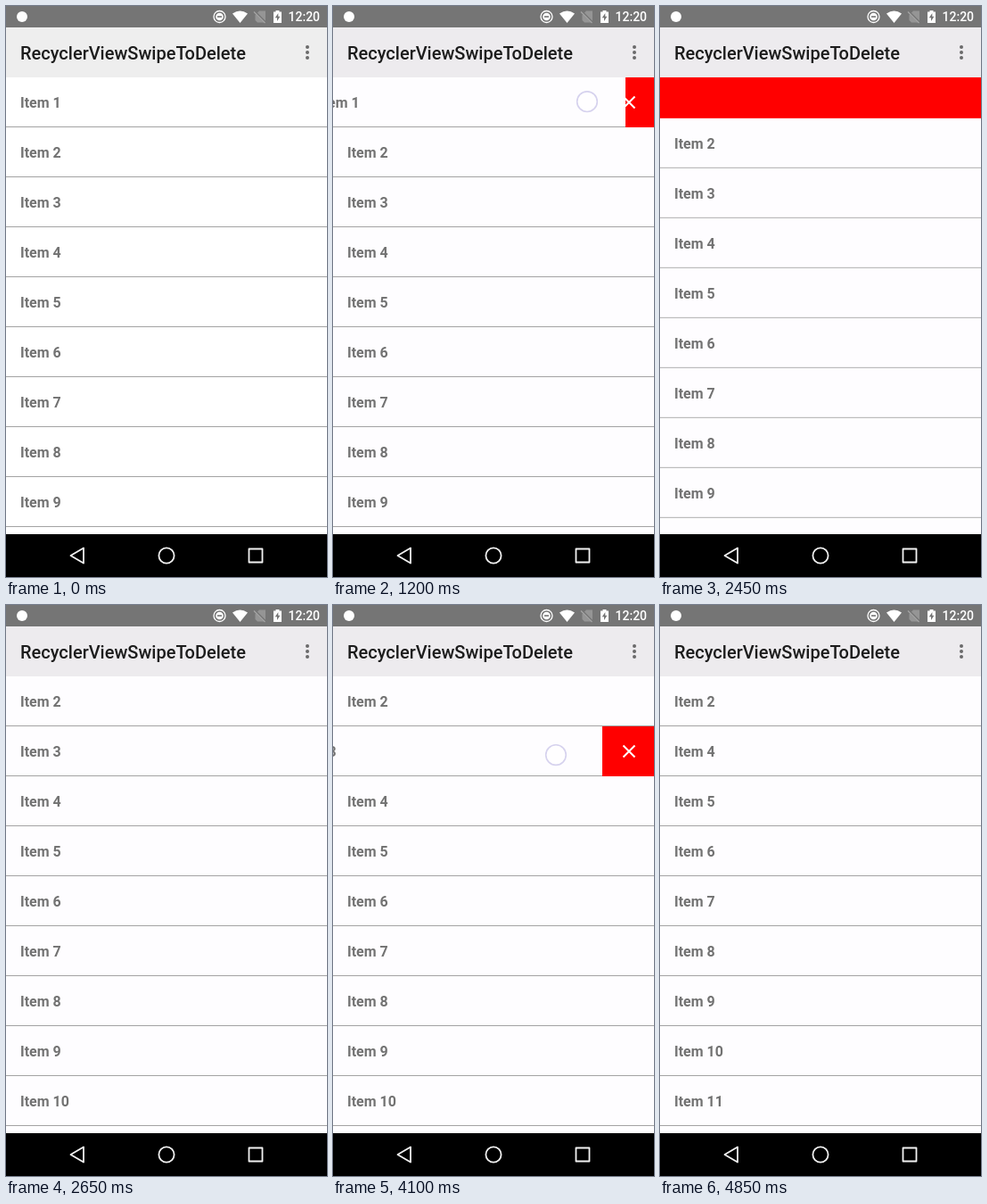
An HTML page with a canvas for the animation above (4900 ms loop, 360x640 px).

```html
<!DOCTYPE html>
<html lang="en">
<head>
<meta charset="utf-8">
<title>Swipe to delete</title>
<style>
  html, body { margin: 0; width: 100%; height: 100%; overflow: hidden; background: #000; }
  canvas { display: block; width: 360px; height: 640px; }
</style>
</head>
<body>
<canvas id="stage" width="360" height="640"></canvas>
<script>
const ctx = document.getElementById('stage').getContext('2d');
const LOOP = 4900, STEP = 50, WIDTH = 360, LIST_TOP = 80, ROW = 56, LIST_END = 592;
const FINGER_START = 321, FINGER_LEAD = 50, SLIDE_TIME = 250;

// Each drag is a path of [time, distance to the left]; the list closes the gap afterwards.
const swipes = [
  { row: 0, start: 700, release: 2100, slide: 2380, touchY: [110, 102],
    path: [[700, 0], [950, 8], [1200, 32], [1500, 56], [1750, 78], [1850, 93], [1950, 126],
           [2000, 156], [2050, 229], [2100, 297], [2150, 343], [2200, 360]] },
  { row: 1, start: 3650, release: 4300, slide: 4580, touchY: [166, 169],
    path: [[3650, 0], [3850, 8], [4000, 34], [4100, 58], [4150, 71], [4200, 97], [4250, 150],
           [4300, 225], [4350, 297], [4400, 343], [4450, 360]] }
];

const clamp01 = v => Math.max(0, Math.min(1, v));
const mix = (a, b, p) => a + (b - a) * p;

function along(path, t) {
  const next = path.findIndex(point => point[0] > t);
  if (next === 0) return path[0][1];
  if (next < 0) return path[path.length - 1][1];
  const [t0, v0] = path[next - 1], [t1, v1] = path[next];
  return mix(v0, v1, (t - t0) / (t1 - t0));
}

function box(color, x, y, w, h) {
  ctx.fillStyle = color;
  ctx.fillRect(x, y, w, h);
}

function text(string, x, y, weight, size, color) {
  ctx.font = `${weight} ${size}px Roboto, sans-serif`;
  ctx.fillStyle = color;
  ctx.fillText(string, x, y);
}

function disc(x, y, r, color) {
  ctx.fillStyle = color;
  ctx.beginPath();
  ctx.arc(x, y, r, 0, Math.PI * 2);
  ctx.fill();
}

function ring(x, y, r, color, width) {
  ctx.strokeStyle = color;
  ctx.lineWidth = width;
  ctx.beginPath();
  ctx.arc(x, y, r, 0, Math.PI * 2);
  ctx.stroke();
}

function fillPath(d, color) {
  ctx.fillStyle = color;
  ctx.fill(new Path2D(d));
}

function strokePath(d, color, width) {
  ctx.strokeStyle = color;
  ctx.lineWidth = width;
  ctx.stroke(new Path2D(d));
}

function drawStatusBar() {
  box('#757575', 0, 0, WIDTH, 24);
  disc(18, 12, 6, '#fff');
  ring(239.5, 12, 6.5, '#fff', 1.3);
  disc(239.5, 12, 4.3, '#fff');
  box('#757575', 237, 11.2, 5, 1.6);
  fillPath('M254 8.5Q262.5 2.5 271 8.5L262.5 19Z', '#fff');
  fillPath('M284 5.5H291V18.5H282L279.5 16V10Z', '#959595');
  strokePath('M278 5.5L291.5 19', '#757575', 2.5);
  strokePath('M278 6.5L290.5 19', '#a5a5a5', 1.2);
  fillPath('M302.5 5H306.5V6.5H309V19H300V6.5H302.5Z', '#fff');
  fillPath('M305.3 8L301.8 13.3H304V17L307.4 11.7H305.3Z', '#757575');
  text('12:20', 316.5, 17, 500, 14, '#fff');
}

function drawToolbar(color) {
  box(color, 0, 24, WIDTH, ROW);
  text('RecyclerViewSwipeToDelete', 16, 59.5, 500, 20, '#1c1c1c');
  for (const y of [46, 52, 58]) disc(338, y, 2, '#6a6a6a');
}

function drawNavigation() {
  box('#000', 0, LIST_END, WIDTH, 48);
  ctx.lineJoin = 'round';
  strokePath('M87 607.5V624.5L72.5 616Z', '#f2f2f2', 1.8);
  ring(180, 616, 8.6, '#f2f2f2', 1.8);
  strokePath('M272.5 608.5H287.5V623.5H272.5Z', '#f2f2f2', 1.8);
  ctx.lineJoin = 'miter';
}

function drawItem(number, x, y, paper) {
  box(paper, x, y, WIDTH, ROW);
  text('Item ' + number, x + 16, y + 34, 700, 16, '#727272');
  box('#a3a3a3', x, y + ROW - 1, WIDTH, 1);
}

function drawList(t, paper) {
  const numbers = Array.from({ length: 12 }, (_, i) => i + 1);
  let active = null, shift = 0;
  for (const swipe of swipes) {
    if (t < swipe.start) break;
    const p = clamp01((t - swipe.slide) / SLIDE_TIME);
    if (p === 1) {
      numbers.splice(swipe.row, 1);
    } else {
      active = swipe;
      shift = ROW * (1 - Math.cos(Math.PI * p)) / 2;
    }
  }

  box(paper, 0, LIST_TOP, WIDTH, LIST_END - LIST_TOP);
  const offset = active ? along(active.path, t) : 0;
  numbers.forEach((number, row) => {
    const y = LIST_TOP + row * ROW;
    if (!active || row < active.row) {
      drawItem(number, 0, y, paper);
    } else if (row > active.row) {
      drawItem(number, 0, y - shift, paper);
    } else {
      box('#f00', 0, y, WIDTH, ROW);
      if (!shift) {
        strokePath(`M325.5 ${y + 21.5}l13 13m0 -13l-13 13`, '#fff', 2);
        drawItem(number, -offset, y, paper);
      }
    }
  });

  if (active && t < active.release) {
    const x = FINGER_START - along(active.path, t + FINGER_LEAD);
    const p = clamp01((t - active.start) / (active.release - active.start));
    const y = mix(...active.touchY, p);
    disc(x, y, 11, 'rgba(255,255,255,.6)');
    ring(x, y, 11.3, '#d6d2ee', 1.6);
  }
}

function draw(t) {
  const touched = t >= swipes[0].start;
  drawList(t, touched ? '#fefdff' : '#fff');
  drawToolbar(touched ? '#edebee' : '#eee');
  drawStatusBar();
  drawNavigation();
}

const startTime = performance.now();
function frame() {
  const t = (performance.now() - startTime) % LOOP;
  draw(Math.floor(t / STEP) * STEP);
  requestAnimationFrame(frame);
}
frame();
</script>
</body>
</html>
```
